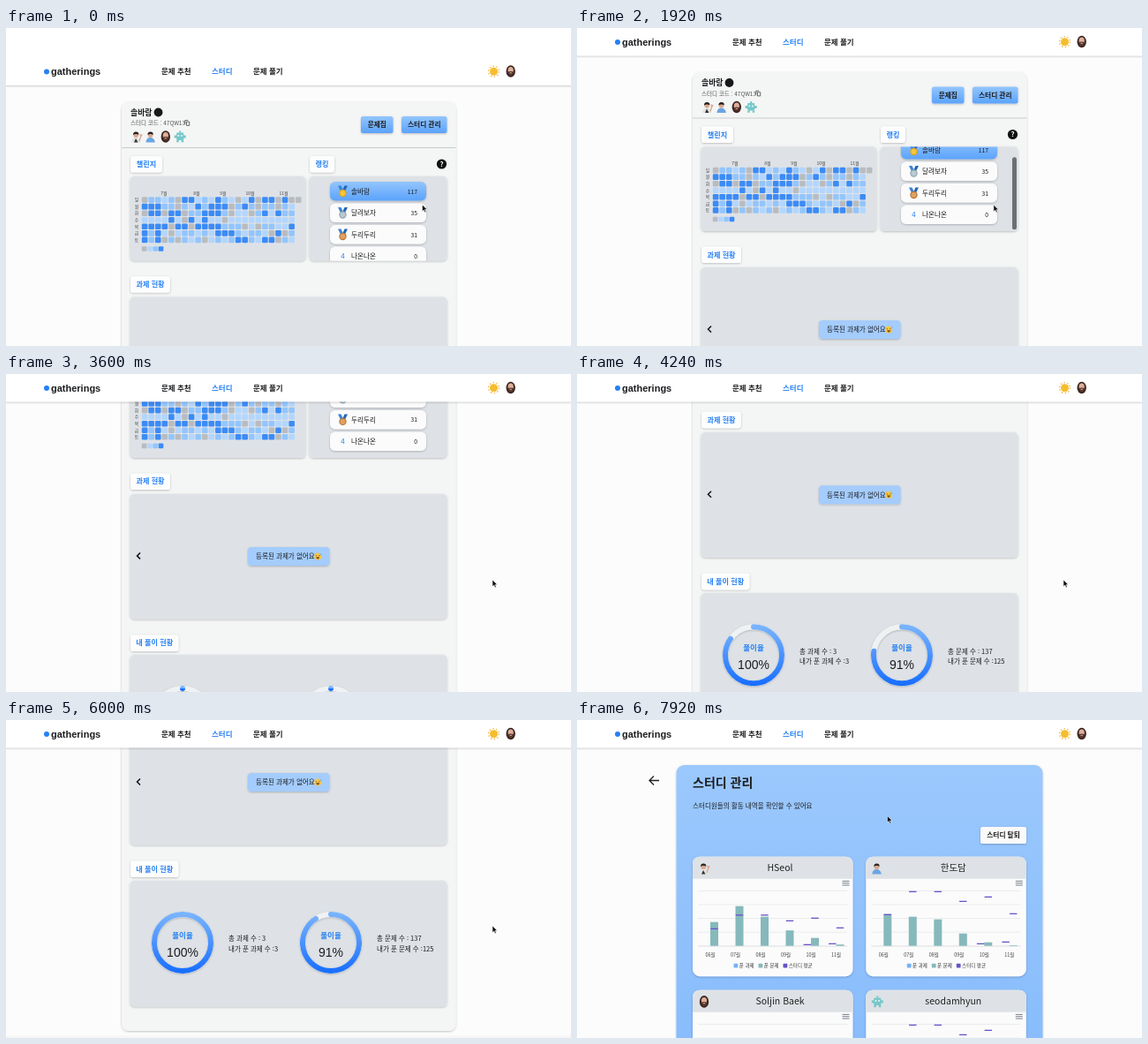
These frames come from a looping animation (640x360 px, 8 s). An HTML page:

```html
<!DOCTYPE html>
<html lang="ko">
<head>
<meta charset="utf-8">
<style>
html, body { margin: 0; width: 100%; height: 100%; overflow: hidden; background: #fcfcfc; }
svg { display: block; width: 100%; height: 100%; font-family: "Noto Sans CJK KR", "Noto Sans CJK", sans-serif; }
text { white-space: pre; }
</style>
</head>
<body>
<svg id="stage" viewBox="0 0 640 360"></svg>
<script>
const BLUE = '#2680f5', INK = '#1c1d1f', PANEL = '#dee2e6';
const BOLD = 'font-weight="700"', MID = 'text-anchor="middle"', END = 'text-anchor="end"';
const SHADOW = 'filter="url(#shadow)"', ARIAL = 'font-family="Liberation Sans, sans-serif"';

// y is the visual middle of the line
const text = (x, y, s, size, fill = INK, attrs = '') =>
  `<text x="${x}" y="${y + size * 0.37}" font-size="${size}" fill="${fill}" ${attrs}>${s}</text>`;
const rect = (x, y, w, h, r, fill, attrs = '') =>
  `<rect x="${x}" y="${y}" width="${w}" height="${h}" rx="${r}" fill="${fill}" ${attrs}/>`;
const circle = (x, y, r, fill, attrs = '') => `<circle cx="${x}" cy="${y}" r="${r}" fill="${fill}" ${attrs}/>`;
const path = (d, fill, attrs = '') => `<path d="${d}" fill="${fill}" ${attrs}/>`;
const line = (d, color, width, attrs = '') => path(d, 'none', `stroke="${color}" stroke-width="${width}" ${attrs}`);
const at = (x, y, body, attrs = '') => `<g transform="translate(${x} ${y})" ${attrs}>${body}</g>`;
const gradient = (id, top, bottom, attrs = 'x2="0" y2="1"') =>
  `<linearGradient id="${id}" ${attrs}><stop stop-color="${top}"/><stop offset="1" stop-color="${bottom}"/></linearGradient>`;

const panel = (x, y, w, h) => rect(x, y, w, h, 5, PANEL, SHADOW);
const chip = (x, y, w, s) => rect(x, y, w, 18.5, 3, '#fdfdfd', SHADOW) +
  text(x + w / 2, y + 9, s, 8.15, BLUE, `${BOLD} ${MID}`);
const button = (x, y, w, s, fill) => rect(x, y, w, 19, 2.5, fill, SHADOW) +
  text(x + w / 2, y + 9.5, s, 7.7, INK, `${BOLD} ${MID}`);

const person = shirt => path('M-6 6.5Q-5.5 1-1 1T4.5 6.5Z', shirt) + circle(-.8, -2, 2.9, '#d8a88e') +
  path('M-4-2A3.2 3.4 0 0 1 2.4-2.2Q-1-4-4-2Z', '#26211f');
const avatars = [
  person('#e4e4e4') + path('M-3 6.5L-1 2L1.5 6.5Z', '#333') + line('M3 5L4.6 0M4.6 0L4-3M4.8 0L6-2.6', '#d8a88e', 1.3),
  person('#6aa5e3'),
  `<ellipse rx="5.2" ry="6.8" fill="#3c2520"/><ellipse cy="-1" rx="3.1" ry="4" fill="#deb09a"/>` +
    path('M-3.2.5Q0-.4 3.2.5Q2.6 5 0 5T-3.2.5Z', '#59362b') + line('M-1.2 1.8H1.2', '#f1d5cc', .8),
  rect(-4, -4.5, 8, 8.5, 1, '#76c7c9') + rect(-6.5, -1.5, 13, 3, 0, '#76c7c9') + rect(-1, -6.5, 2, 2, 0, '#76c7c9') +
    rect(-4, 4, 2.5, 2.3, 0, '#76c7c9') + rect(1.5, 4, 2.5, 2.3, 0, '#76c7c9') +
    rect(-2.6, -2, 1.6, 1.8, 0, '#f6fbfb') + rect(1, -2, 1.6, 1.8, 0, '#f6fbfb')
];
const medal = (x, y, color, rim) => at(x, y,
  path('M-5.5-6.5H-2L1 0L-1.6 1.5Z', '#3b82d6') + path('M5.5-6.5H2L-1 0L1.6 1.5Z', '#2366b8') +
  circle(0, 2, 4.2, rim) + circle(0, 2, 3, color));

// Activity map: columns per weekday that are busiest, then those that are empty
const days = [
  ['일', [6, 7, 11, 16, 18, 19, 21], [0, 5, 14, 17, 20, 22, 23]],
  ['월', [0, 1, 2, 8, 10, 11, 12, 15], [5, 13, 17, 20]],
  ['화', [1, 2, 4, 5, 9, 10, 11, 18, 20], [0, 3, 6, 13, 16]],
  ['수', [4, 7, 9], [6, 12]],
  ['목', [0, 1, 2, 3, 5, 6, 8, 9, 10, 11, 22], [4, 7, 15, 17]],
  ['금', [0, 2, 11, 12, 13, 20], [4, 19, 21]],
  ['토', [0, 2, 14, 15, 18, 19], [3, 5, 9, 20]]
];
const heat = ['#b9bcbf', '#b3d6fe', '#93c5fd', '#3b8bf6'];
const level = (c, r, busy, empty) =>
  busy.includes(c) ? 3 : empty.includes(c) ? 0 : (c * 7 + r * 5 + c * r) % 5 < 2 ? 1 : 2;
const heatmap = [[179, '7월'], [216, '8월'], [246, '9월'], [276.5, '10월'], [314.5, '11월']]
  .map(([x, s]) => text(x, 187, s, 5, '#444', MID)).join('') +
  days.map(([day, busy, empty], r) => text(148, 194.6 + r * 7.55, day, 4.8, '#444', MID) +
    Array.from({ length: r ? 23 : 24 }, (_, c) =>
      rect(153.8 + c * 7.57, 191.3 + r * 7.55, 6.6, 6.6, 1.3, heat[level(c, r, busy, empty)])).join('')).join('') +
  heat.map((fill, i) => rect(153.8 + i * 6.3, 247.2, 5.6, 5.6, 1, fill)).join('');

const ranking = [['솔바람', 117], ['달려보자', 35], ['두리두리', 31], ['나온나온', 0]].map(([name, score], i) => {
  const y = 174 + i * 24.5, mid = y + 11;
  const badge = i < 3 ? medal(381.5, mid, ['#f7c63c', '#b9cbd3', '#e0a163'][i], ['#e0a21b', '#8fa6b1', '#b87436'][i])
    : text(381.5, mid, 4, 8, BLUE, MID);
  return rect(367, y, 109, 21.5, 6, i ? '#fbfbfb' : 'url(#sky)', SHADOW) + badge +
    text(391, mid, name, 7.6) + text(466, mid, score, 6.8, INK, END);
}).join('');

const RING = 'M0-32a32 32 0 1 1 0 64a32 32 0 1 1 0-64';
const rings = [['과제', 200, 100, '3', '3'], ['문제', 368, 91, '137', '125']];
const ring = ([kind, x, percent, total, done], i) => at(x, 556.5,
  line(RING, '#f0f1f3', 6, SHADOW) +
  line(RING, `url(#arc${i})`, 6, `id="ring${i}" pathLength="100" stroke-linecap="round"`) +
  text(0, -8, '풀이율', 8.5, BLUE, `${MID} ${BOLD}`) + text(0, 11, percent + '%', 14, INK, `${MID} ${ARIAL}`) +
  text(52, -4.5, `총 ${kind} 수 : ${total}`, 7.5) + text(52, 7, `내가 푼 ${kind} 수 :${done}`, 7.5));

const studyPage = rect(131, 84, 378.5, 572.5, 8, '#f4f5f5', SHADOW) +
  text(141, 95.5, '솔바람', 8.9, INK, BOLD) + circle(172.5, 95.5, 4.9, '#17181a') +
  text(141, 108, '스터디 코드 : 47QW13', 6.5, '#555') +
  line('M204.5 106.2h3.2v4.2h-3.2zM202.8 109v-4.4h3.4', '#444', .8) +
  avatars.map((a, i) => at(148 + i * 16.4, 123, a)).join('') +
  button(402, 100, 36.5, '문제집', 'url(#sky)') + button(448, 100, 51.5, '스터디 관리', 'url(#sky)') +
  line('M455 115.2H492', INK, .7, 'id="underline"') +
  line('M131 135.5H509.5', '#c9cccf', 1) +
  chip(141, 145, 36, '챌린지') + chip(344, 145, 28, '랭킹') +
  circle(493.5, 154, 5.6, '#111') + text(493.5, 154, '?', 8, '#fff', `${MID} ${BOLD}`) +
  panel(140.5, 168, 199, 95.5) + heatmap + panel(343.5, 168, 156, 95.5) +
  `<g clip-path="url(#listBox)"><g id="list">${ranking}</g>${rect(493, 168, 5, 82, 2.5, '#6c7074', 'id="thumb"')}</g>` +
  chip(141, 281, 45, '과제 현황') + panel(140.5, 304.5, 359, 141.5) +
  line('M152 371l-3.5 3.5 3.5 3.5', '#111', 1.5) +
  rect(274, 364.5, 92.5, 21, 4, '#a4ccfd', SHADOW) + text(283, 375, '등록된 과제가 없어요', 7.55) +
  at(353.2, 375, circle(0, 0, 4, '#f6c544') + line('M-2.4-.8h1.4M1-.8h1.4', '#6b4317', .7) +
    path('M-2 .8H2Q1.4 3 0 3T-2 .8Z', '#7a4a1c') + circle(3.2, -2.2, 1, '#72b8ee')) +
  chip(141, 464, 54.5, '내 풀이 현황') + panel(140.5, 486.5, 359, 142.5) + rings.map(ring).join('') +
  rect(0, 662, 640, 40, 0, '#f6f6f6');

const months = ['06월', '07월', '08월', '09월', '10월', '11월'];
const legend = [[46.5, '#74b2fa', '푼 과제'], [74.5, '#86b9bb', '푼 문제'], [102.5, '#6a52c9', '스터디 평균']];
const stats = [
  { bars: [27, 45, 33, 17.5, 9, 1.5], goals: [20, 35.5, 35.5, 29, 32, 21], tail: [2, 3] },
  { bars: [36, 33, 30, 14, 4, .7], goals: [36, 62, 62, 51, 56, 37], tail: [3, 5] }
];
const goal = (x, h) => rect(x - 4.2, 101 - h, 8.4, 1.3, 0, '#6a52c9');
const chart = (name, i) => {
  const { bars, goals, tail } = stats[i % 2];
  return at(131 + i % 2 * 196.3, 154.7 + (i > 1 ? 151 : 0),
    rect(0, 0, 181.5, 135.5, 8, '#fbfbfb', SHADOW) +
    path('M0 25V8Q0 0 8 0H173.5Q181.5 0 181.5 8V25Z', PANEL) +
    at(13, 13.2, avatars[i]) + text(99, 12.8, name, 10.5, '#222', MID) +
    line('M169.5 27.7h8M169.5 30h8M169.5 32.3h8', '#777f88', 1) +
    line('M6 38.7H175M6 54.3H175M6 69.9H175M6 85.5H175', '#e3e5e7', .7) + line('M6 101.3H175', '#d2d5d8', .8) +
    at(0, 101, bars.map((h, m) => rect(20 + m * 28.5, -h, 9, h, 0, '#86b9bb')).join(''), 'class="bars"') +
    goals.map((h, m) => goal(24.5 + m * 28.5, h)).join('') +
    tail.map((h, m) => goal(129.8 + m * 28.5, h)).join('') +
    months.map((s, m) => text(20 + m * 28.5, 111.5, s, 5.5, '#444', MID)).join('') +
    legend.map(([x, fill, s]) => rect(x, 121, 4.8, 4.8, .8, fill) + text(x + 6.3, 123.4, s, 5.5, '#333')).join(''));
};
const managePage = rect(112.5, 51, 415, 400, 9, 'url(#card)', SHADOW) +
  line('M93 68.5H82M87 63.5l-5 5 5 5', '#222', 1.3) +
  text(131, 71, '스터디 관리', 14, INK, BOLD) + text(131, 97, '스터디원들의 활동 내역을 확인할 수 있어요', 7.55) +
  button(457, 121, 52, '스터디 탈퇴', '#fafafa') +
  ['HSeol', '한도담', 'Soljin Baek', 'seodamhyun'].map(chart).join('');

const header = rect(-10, -50, 660, 81.3, 0, '#fff', SHADOW) +
  circle(46, 16, 3, BLUE) + text(51, 15.6, 'gatherings', 11, INK, `${BOLD} ${ARIAL}`) +
  text(176, 15.8, '문제 추천', 8.5, INK, BOLD) + text(233, 15.8, '스터디', 8.5, BLUE, BOLD) +
  text(280, 15.8, '문제 풀기', 8.5, INK, BOLD) +
  at(552.5, 15.7, circle(0, 0, 4.5, '#f5bd2f') +
    circle(0, 0, 6, 'none', 'stroke="#f3b541" stroke-width="1.3" stroke-dasharray="1.5 2.27"')) +
  at(571.7, 15.5, avatars[2]);

const arrow = path('M0 0V7.6L1.8 6L3 8.7L4.3 8.1L3.1 5.5H5.5Z', '#111', 'id="arrow" stroke="#fff" stroke-width=".5"');
const hand = path('M-.8.6Q0-.6.8.6V3L3.6 3.8Q4.4 4.2 4 5.6L3.2 8.2H-1.2L-3.4 5Q-3-4.4 3.8-.8 4.8Z'.replace('Q-3-4.4 3.8-.8 4.8Z', 'Q-3 3.8-.8 5Z'),
  '#222', 'id="hand" stroke="#fff" stroke-width=".6"');

stage.innerHTML = `<defs>
  <filter id="shadow" x="-10%" y="-20%" width="120%" height="150%">
    <feDropShadow dx="0" dy=".8" stdDeviation="1" flood-opacity=".25"/></filter>
  ${gradient('sky', '#93c5fd', '#5ba3fb')}${gradient('card', '#9bc8fd', '#83b9fc')}
  ${rings.map((_, i) => gradient('arc' + i, '#78b3fc', '#1a70ff', 'gradientUnits="userSpaceOnUse" x1="0" x2="0" y1="-32"')).join('')}
  <clipPath id="listBox">${rect(343.5, 168, 156, 95.5, 5, '#000')}</clipPath></defs>
  ${rect(0, 0, 640, 360, 0, '#fcfcfc')}
  <g id="study">${studyPage}</g><g id="manage">${managePage}</g><g id="header">${header}</g>
  <g id="cursor">${arrow}${hand}</g>`;

const $ = id => document.getElementById(id);
const move = (el, x, y, extra = '') => el.setAttribute('transform', `translate(${x} ${y}) ${extra}`);
const show = (id, on) => $(id).setAttribute('visibility', on ? 'visible' : 'hidden');
const clamp = p => Math.min(1, Math.max(0, p));
const smooth = p => p * p * (3 - 2 * p);
const easeOut = p => 1 - (1 - p) ** 3;

// Value at time t along [time, value] keys
function track(t, keys, ease = p => p) {
  const next = keys.findIndex(k => k[0] > t);
  if (next < 0) return keys[keys.length - 1][1];
  if (next === 0) return keys[0][1];
  const [t0, v0] = keys[next - 1], [t1, v1] = keys[next];
  return v0 + (v1 - v0) * ease((t - t0) / (t1 - t0));
}

const TOP = 33.5, SWITCH = 7280;
const scrollKeys = [[2440, TOP], [2720, 80.5], [3600, 168.5], [4850, 304.5]];
const cursorX = [[1900, 471.5], [2400, 551], [6480, 551], [6880, 473.5], [7360, 473.5], [7800, 351.5]];
const cursorY = [[1900, 200], [2400, 233], [6480, 233], [6880, 79], [7360, 79], [7800, 108.5]];
const bars = document.querySelectorAll('.bars');

function draw(t) {
  const scroll = t < 2440 ? track(t, [[80, 0], [600, TOP]], smooth)
    : t < 6160 ? track(t, scrollKeys) : track(t, [[6160, 304.5], [6640, TOP]], smooth);
  move($('study'), 0, -scroll);
  move($('header'), 0, Math.max(0, TOP - scroll));

  const listScroll = track(t, [[1000, 0], [1500, 13.5], [6160, 13.5], [6640, 0]], smooth);
  move($('list'), 0, -listScroll);
  move($('thumb'), 0, listScroll * .87);
  $('thumb').setAttribute('opacity', track(t, [[960, 0], [1060, 1], [2900, 1], [3150, 0]]));

  rings.forEach(([, , percent], i) => {
    const p = percent / 100 * easeOut(clamp((t - 3680) / 1200));
    $('ring' + i).setAttribute('stroke-dasharray', `${Math.max(.01, p * 100)} 200`);
    $('arc' + i).setAttribute('y2', Math.max(-31.9, -32 * Math.cos(2 * Math.PI * Math.min(.5, p))));
  });

  const managing = t >= SWITCH, hovering = t >= 6840 && !managing;
  show('study', !managing);
  show('manage', managing);
  show('underline', hovering);
  show('hand', hovering);
  show('arrow', !hovering);
  const growth = easeOut(clamp((t - SWITCH) / 600));
  bars.forEach(el => move(el, 0, 101, `scale(1 ${growth})`));
  move($('cursor'), track(t, cursorX, smooth), track(t, cursorY, smooth));
}

function tick() {
  draw(performance.now() % 8000);
  requestAnimationFrame(tick);
}
tick();
</script>
</body>
</html>
```
